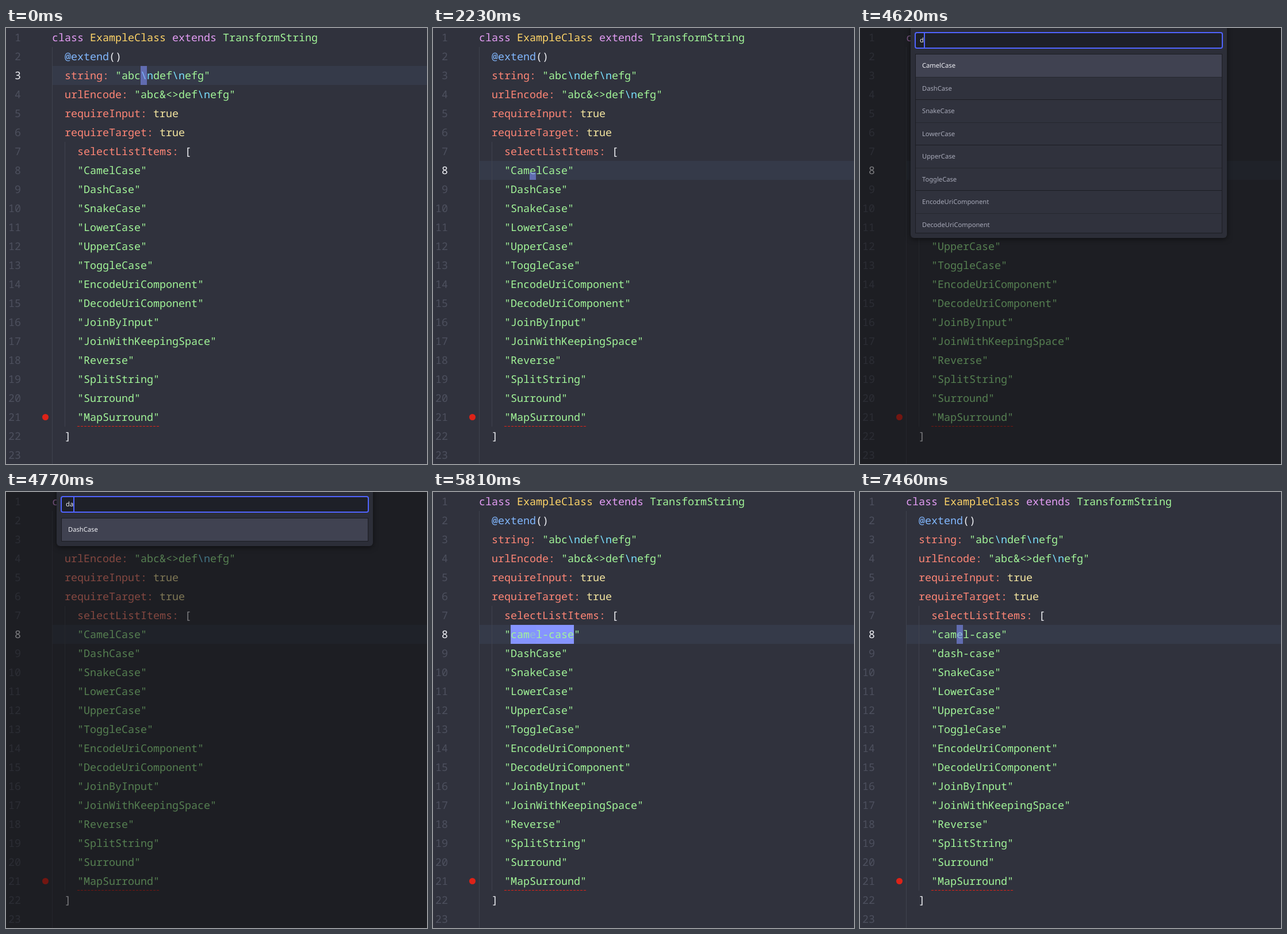
These frames come from a looping animation (732x758 px, 8000 ms). An HTML page:

```html
<!DOCTYPE html>
<html lang="en">
<head>
<meta charset="utf-8">
<title>Transform string</title>
<style>
  html, body { margin: 0; width: 100%; height: 100%; overflow: hidden; background: #30323d; }
  svg { display: block; text-rendering: geometricPrecision; }
  .code text { font: 18.3333px "Noto Sans Mono", monospace; }
  .ui text { font: 11.2px "Noto Sans", sans-serif; }
  .ui .panel { filter: drop-shadow(0 2px 5px rgba(0, 0, 0, .5)); }
</style>
</head>
<body>
<script>
const LOOP = 8000, ROW = 33, COL = 11, LEFT = 80, ITEM = 39.5;
const GREEN = '#a2f598', WHITE = '#eff0f5', DIM = '#4d505e';

const items = ['CamelCase', 'DashCase', 'SnakeCase', 'LowerCase', 'UpperCase', 'ToggleCase',
  'EncodeUriComponent', 'DecodeUriComponent', 'JoinByInput', 'JoinWithKeepingSpace',
  'Reverse', 'SplitString', 'Surround', 'MapSurround'];
const lines = [
  'class ExampleClass extends TransformString',
  '  @extend()',
  '  string: "abc\\ndef\\nefg"',
  '  urlEncode: "abc&<>def\\nefg"',
  '  requireInput: true',
  '  requireTarget: true',
  '    selectListItems: [',
  ...items.map(name => `    "${name}"`),
  '  ]',
  ''
];

// Each capture group takes the colour at the same place; the rest is a string.
const TOKEN = /(class|extends)|(ExampleClass)|(@extend)|(\w+:)|(\\n)|(true)|([()[\]])|[^\s\\]+/g;
const COLORS = ['#e49df5', '#ffd568', '#82b8ff', '#ff8676', '#7ae0ff', '#f5e6a0', WHITE];

// Every step changes only the properties it names.
const steps = [
  [0, { line: 3, col: 14, half: false, cursor: true, open: false, shade: 0, query: '',
        caret: false, count: 8, flash: 0, done: 0 }],
  [300, { line: 4 }],
  [450, { line: 5 }],
  [600, { line: 7 }],
  [750, { line: 8 }],
  [1050, { col: 13 }],
  [1340, { col: 10 }],
  [1490, { col: 8 }],
  [2230, { half: true }],
  [2680, { open: true, cursor: false, shade: .42 }],
  [2830, { shade: .5, caret: true }],
  [3280, { caret: false }],
  [3580, { caret: true }],
  [4030, { caret: false }],
  [4480, { caret: true }],
  [4620, { query: 'd' }],
  [4770, { query: 'da', count: 1 }],
  [4920, { query: 'das' }],
  [5510, { caret: false }],
  [5810, { open: false, shade: 0, cursor: true, half: false, done: 1, flash: 10 }],
  [5960, { flash: 0 }],
  [6410, { line: 9 }],
  [6710, { done: 2, flash: 9 }],
  [6860, { flash: 0 }],
  [7460, { line: 8 }]
];
let last = {};
const states = steps.map(([at, change]) => last = { ...last, ...change, at });

function set(node, attrs) {
  for (const key in attrs) node.setAttribute(key, attrs[key]);
  return node;
}
function add(parent, tag, attrs = {}, label = '') {
  const node = set(document.createElementNS('http://www.w3.org/2000/svg', tag), attrs);
  node.textContent = label;
  return parent.appendChild(node);
}
const rect = (parent, x, y, width, height, fill, more) =>
  add(parent, 'rect', { x, y, width, height, fill, ...more });
const text = (parent, x, y, fill, label, more) =>
  add(parent, 'text', { x, y, fill, ...more }, label);
const show = (node, on) => set(node, { visibility: on ? 'visible' : 'hidden' });

const svg = add(document.body, 'svg', { width: 732, height: 758, viewBox: '0 0 732 758' });

// Editor
const code = add(svg, 'g', { class: 'code' });
rect(code, 0, 0, 732, 758, '#30323d');
const active = rect(code, LEFT, 0, 652, ROW, '#353a49');
rect(code, 80, 33, 1, 725, '#3f424e');
rect(code, 102, 198, 1, 495, '#3f424e');
const flash = rect(code, 135, 0, 0, ROW, '#8694ff');
const rows = lines.map((line, i) => {
  const y = i * ROW + 23;
  const number = text(code, 26, y, DIM, i + 1, { 'text-anchor': 'end' });
  const words = [...line.matchAll(TOKEN)].map(m => {
    const kind = m.slice(1).findIndex(Boolean);
    return text(code, LEFT + m.index * COL, y, COLORS[kind] || GREEN, m[0]);
  });
  return { number, words };
});
add(code, 'circle', { cx: 68.5, cy: 676.5, r: 5.5, fill: '#dd2318' });
add(code, 'path', { d: 'M124 692.5H267', stroke: '#dd2318', 'stroke-dasharray': '4 2' });
const cursor = rect(code, 0, 0, COL, ROW, '#8292ff', { 'fill-opacity': .57 });
const shade = rect(svg, 0, 0, 732, 758, '#0a0a0b');

// Select list
const ui = add(svg, 'g', { class: 'ui' });
const panel = rect(ui, 88, -10, 550, 376, '#2c2e38', { rx: 6, class: 'panel' });
rect(ui, 96, 8, 534, 27, '#1e2028', { rx: 3, stroke: '#5064ff', 'stroke-width': 2 });
const query = text(ui, 104, 25, WHITE, '');
const caret = rect(ui, 104, 9, 2, 25, '#5064ff');
const clip = add(add(ui, 'clipPath', { id: 'clip' }), 'rect', { x: 96, y: 45, width: 534 });
const list = add(ui, 'g', { 'clip-path': 'url(#clip)' });
const entries = items.slice(0, 8).map((name, i) => {
  const y = 46 + i * ITEM;
  rect(list, 97, y, 532, ITEM, i ? '#30323d' : '#404251');
  rect(list, 97, Math.floor(y + ITEM - .5), 532, 1, '#1c1d23');
  return text(list, 108, y + 23, i ? '#a7a9b8' : WHITE, name);
});
const frame = rect(ui, 96.5, 45.5, 533, 0, 'none', { stroke: '#1c1d23' });

function draw(s) {
  const top = (s.line - 1) * ROW;
  set(active, { y: top });
  rows.forEach((row, i) => set(row.number, { fill: i + 1 === s.line ? WHITE : DIM }));
  rows[7].words[0].textContent = s.done > 0 ? '"camel-case"' : '"CamelCase"';
  rows[8].words[0].textContent = s.done > 1 ? '"dash-case"' : '"DashCase"';
  set(flash, { y: top, width: s.flash * COL });

  const cut = s.half ? 20 : 0;
  set(cursor, { x: LEFT + s.col * COL, y: top + cut, height: ROW - cut });
  show(cursor, s.cursor);
  set(shade, { opacity: s.shade });

  const height = Math.min(s.count * ITEM + 1.5, 312);
  set(panel, { height: height + 63 });
  set(clip, { height });
  set(frame, { height: height - 1 });
  entries[0].textContent = s.count > 1 ? items[0] : items[1];
  query.textContent = s.query;
  set(caret, { x: 104 + Math.round(s.query ? query.getComputedTextLength() : 0) });
  set(ui, { display: s.open ? 'inline' : 'none' });
  show(caret, s.caret);
}

let shown;
function tick() {
  const time = performance.now() % LOOP;
  const state = states.findLast(s => s.at <= time);
  if (state !== shown) {
    // The panel must be laid out before its text can be measured.
    set(ui, { display: 'inline' });
    draw(shown = state);
  }
  requestAnimationFrame(tick);
}
tick();
</script>
</body>
</html>
```
